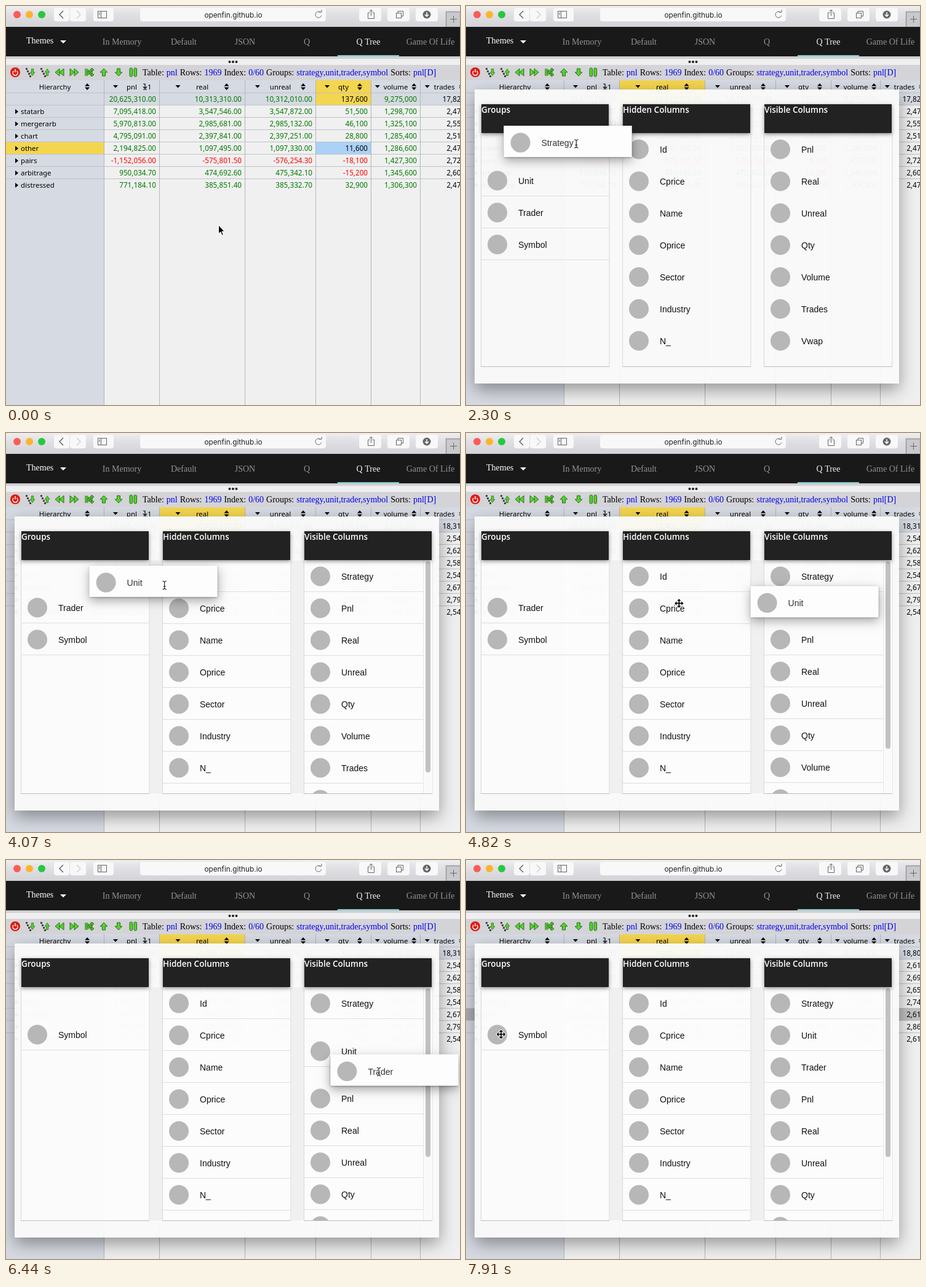
These frames come from a looping animation (738 px wide and 650 px high, 8 s). An HTML page with a canvas:

```html
<!DOCTYPE html>
<html lang="en">
<head>
<meta charset="utf-8">
<title>Grid column editor</title>
<style>
html, body { margin: 0; width: 738px; height: 650px; overflow: hidden; background: #f0f0f0; }
canvas { display: block; }
</style>
</head>
<body>
<canvas id="stage" width="738" height="650"></canvas>
<script>
const g = document.getElementById('stage').getContext('2d');
const LOOP = 8000, STEP = 148, ROW = 52, LIST_TOP = 208, SETTLE = 260;
const GRID = '11.7px "Noto Sans", sans-serif';
const LABEL = '11.4px "Noto Sans", sans-serif';
const SERIF = '14px "Liberation Serif", serif';
const SANS = '14px "Liberation Sans", sans-serif';
const HEAD = '600 13.5px "Open Sans", sans-serif';

// start and number of steps of each run of changes
const runs = [[0, 1], [500, 1], [1250, 2], [1700, 3], [2300, 8], [3490, 8], [4670, 5], [5550, 8], [6730, 2], [7170, 6]];

// real and unreal profit, quantity, volume, trades, and profit gained per update in thousands
const strategies = {
  statarb: [3547546, 3547872, 51500, 1298700, 2474, -50],
  mergerarb: [2985681, 2985132, 46100, 1325100, 2554, 130],
  chart: [2397840.6, 2397250.6, 28800, 1285400, 2514, -280],
  other: [1097495, 1097330, 11600, 1286600, 2474, 0],
  pairs: [-575801.5, -576254.3, -18100, 1427300, 2724, -60],
  arbitrage: [474692.6, 475342.1, -15200, 1345600, 2604, 470],
  distressed: [385851.4, 385332.7, 32900, 1306300, 2477, -120]
};

const edges = [159, 249, 388, 503, 593, 673, 751];
const labels = ['Hierarchy', 'pnl', 'real', 'unreal', 'qty', 'volume', 'trades'];

// pointer moves: start, end, target
const moves = [[1550, 2000, 106, 240], [2090, 2190, 106, 222], [2195, 3190, 550, 237], [3380, 3770, 105, 235],
  [3740, 4590, 540, 272], [4650, 5260, 78, 285], [5560, 6433, 606, 345], [7050, 7910, 57, 284]];

// close: the gap left behind shuts, open: a gap appears in the visible list
const drags = [
  { name: 'Strategy', grab: 2290, release: 3080, close: 2600, open: 2740 },
  { name: 'Unit', grab: 3780, release: 4720, close: LOOP, open: 4080 },
  { name: 'Trader', grab: 5690, release: 6500, close: 5840, open: 5850 }
];

const smooth = (t, from, length = 300) => {
  const k = Math.min(1, Math.max(0, (t - from) / length));
  return k * k * (3 - 2 * k);
};
const mix = (a, b, k) => a + (b - a) * k;

function heldTime(t) {
  const [start, steps] = runs.filter(r => r[0] <= t).pop();
  return start + STEP * Math.min(steps - 1, Math.floor((t - start) / STEP + 1e-6));
}

function pointerAt(t) {
  let x = 345, y = 357;
  for (const [start, end, toX, toY] of moves) {
    const k = Math.sin(Math.PI / 2 * Math.min(1, Math.max(0, (t - start) / (end - start))));
    x = mix(x, toX, k); y = mix(y, toY, k);
  }
  return [x, y];
}

function tableAt(t) {
  const update = (t > 2590) + (t > 7460);
  const rows = Object.entries(strategies).map(([name, [real, unreal, qty, volume, trades, gain]]) => {
    const a = real + 1000 * gain * update, b = unreal + 1000 * gain * update;
    return [name, a + b, a, b, qty, volume * (1 + .026 * update), trades + 70 * update];
  }).sort((p, q) => Math.abs(q[1]) - Math.abs(p[1]));
  const total = labels.map((_, c) => c ? rows.reduce((sum, r) => sum + r[c], 0) : '');
  return [total, ...rows];
}

function format(value, column) {
  const digits = column < 4 ? 2 : 0;
  return Number(value.toPrecision(column === 5 ? 5 : 7))
    .toLocaleString('en-US', { minimumFractionDigits: digits, maximumFractionDigits: digits });
}

function rect(x, y, w, h, color) { g.fillStyle = color; g.fillRect(x, y, w, h); }
function text(s, x, y, font, color, align = 'left') {
  g.font = font; g.fillStyle = color; g.textAlign = align; g.fillText(s, x, y);
}
function shape(points, color, stroke) {
  g.beginPath();
  points.forEach(([x, y]) => g.lineTo(x, y));
  g.closePath();
  g.fillStyle = color; g.fill();
  if (stroke) { g.strokeStyle = stroke; g.lineWidth = 1; g.stroke(); }
}
function disc(x, y, r, color) {
  g.beginPath(); g.arc(x, y, r, 0, 7); g.fillStyle = color; g.fill();
}
function lines(color, width, ...paths) {
  g.strokeStyle = color; g.lineWidth = width;
  g.beginPath();
  for (const p of paths) p.forEach(([x, y], i) => i ? g.lineTo(x, y) : g.moveTo(x, y));
  g.stroke();
}
function round(x, y, w, h, r, color) {
  g.beginPath(); g.roundRect(x, y, w, h, r); g.fillStyle = color; g.fill();
}
function placed(x, y, draw) { g.save(); g.translate(x, y); draw(); g.restore(); }
function shadow(blur, dy, alpha) {
  g.shadowColor = `rgba(0,0,0,${alpha})`; g.shadowBlur = blur; g.shadowOffsetY = dy;
}
// words laid out one after another
function words(list, x, gap, draw) {
  g.font = SERIF;
  list.forEach((s, i) => { draw(s, x, i); x += g.measureText(s).width + gap; });
}

function drawBrowser() {
  const bar = g.createLinearGradient(0, 0, 0, 34);
  bar.addColorStop(0, '#eeeeef'); bar.addColorStop(.4, '#e0e0e4'); bar.addColorStop(1, '#d2d2d7');
  rect(0, 0, 738, 34, bar);
  ['#fc5b57', '#fdb42c', '#27c83f'].forEach((c, i) => disc(18 + 20 * i, 14, 6, c));
  [[78, 25], [104, 26], [142, 33], [218, 302], [574, 36], [620, 36], [666, 36]]
    .forEach(([x, w]) => round(x, 3, w, 22, 4, '#f8f8f9'));
  lines('#555', 1.3, [[93, 8], [87, 14], [93, 20]]);
  lines('#ccc', 1.3, [[115, 8], [121, 14], [115, 20]]);
  g.strokeStyle = '#666'; g.lineWidth = 1;
  g.strokeRect(149.5, 8.5, 14, 11);
  lines('#666', 1, [[154.5, 9], [154.5, 19]], [[151, 11.5], [153, 11.5]], [[151, 13.5], [153, 13.5]]);
  text('openfin.github.io', 369.5, 19, '11.8px Inter, sans-serif', '#222', 'center');
  g.beginPath(); g.arc(508, 14, 5, .3, 5.5); g.stroke();
  lines('#666', 1, [[508, 10], [513, 10], [513, 6]]);
  placed(593.5, 6, () => lines('#666', 1, [[-2, 5], [-5, 5], [-5, 14.5], [5, 14.5], [5, 5], [2, 5]],
    [[0, 10], [0, 0]], [[-3, 3], [0, 0], [3, 3]]));
  g.strokeRect(634.5, 11.5, 8, 8);
  lines('#666', 1, [[637, 11], [637, 8.5], [645.5, 8.5], [645.5, 16.5], [643, 16.5]]);
  disc(684, 14, 6.5, '#666');
  lines('#fff', 1.5, [[684, 10], [684, 17]], [[681, 14], [684, 17], [687, 14]]);
  rect(715, 9, 23, 25, '#c9c9cd');
  g.strokeStyle = '#999'; g.strokeRect(715.5, 9.5, 23, 25);
  lines('#666', 1, [[722, 21.5], [733, 21.5]], [[727.5, 16], [727.5, 27]]);

  rect(0, 34, 738, 48, '#191919');
  text('Themes', 33, 61, SERIF, '#fff');
  shape([[88, 56], [98, 56], [93, 61]], '#fff');
  words(['In Memory', 'Default', 'JSON', 'Q', 'Q Tree', 'Game Of Life'], 157, 0, (s, _, i) =>
    text(s, [188.5, 289, 388.5, 489, 589, 690][i], 63, SERIF, s === 'Q Tree' ? '#f2f2f2' : '#929292', 'center'));
  rect(539, 80, 100, 2, '#80cbc4');
}

function drawToolbar() {
  rect(0, 82, 738, 4, '#d0d0d4');
  rect(0, 86, 738, 10, '#efeff0');
  [363.5, 369, 374.5].forEach(x => disc(x, 91, 2, '#222'));
  rect(0, 96, 738, 25, '#d3d3d8');
  disc(15, 108, 8, '#e01b10');
  g.strokeStyle = '#fff'; g.lineWidth = 1.5;
  g.beginPath(); g.arc(15, 109, 4, -.9, 4); g.stroke();
  lines('#fff', 1.5, [[15, 103], [15, 108]]);
  const lime = '#5ad02e', dark = '#25701a';
  const arrow = up => shape([[-6, 0], [0, 6], [6, 0], [2.5, 0], [2.5, -6], [-2.5, -6], [-2.5, 0]]
    .map(([x, y]) => [x, up ? -y : y]), lime, dark);
  const tree = up => {
    for (let i = 0; i < 4; i++) rect(-7 + 2 * i, -7 + 4 * i, 3, 3, '#444');
    g.translate(4, 0); g.scale(.65, .9); arrow(up);
  };
  const rewind = side => {
    g.scale(side, 1);
    [-7, 0].forEach(x => shape([[x, 0], [x + 7, -6], [x + 7, 6]], lime, dark));
  };
  const shuffle = () => [-4, 0, 4].forEach(y => {
    const path = [[-7, y], [-3, y], [3, -y], [6, -y]];
    lines(dark, 3.2, path);
    lines(lime, 1.6, path);
    if (y) shape([[4, y - 3], [8, y], [4, y + 3]], lime, dark);
  });
  const pause = () => [-6, 1].forEach(x => {
    round(x, -7, 4.5, 14, 2, lime);
    g.strokeStyle = dark; g.lineWidth = 1; g.stroke();
  });
  [() => tree(false), () => tree(true), () => rewind(1), () => rewind(-1), shuffle,
    () => arrow(true), () => arrow(false), pause].forEach((icon, i) => placed(39 + 24 * i, 108, icon));
  words(['Table:', 'pnl', 'Rows:', '1969', 'Index:', '0/60', 'Groups:', 'strategy,unit,trader,symbol', 'Sorts:', 'pnl[D]'],
    222, 4, (s, x, i) => text(s, x, 113, SERIF, i % 2 ? '#0000f0' : '#000'));
}

function drawHeader() {
  labels.forEach((name, c) => {
    const left = c ? edges[c - 1] + 1 : 0, right = edges[c], middle = (left + right) / 2;
    text(name, middle, 136, LABEL, '#000', 'center');
    const half = g.measureText(name).width / 2;
    const menu = (left + middle - half) / 2, sort = (right + middle + half) / 2;
    if (c) shape([[menu - 4, 129], [menu + 4, 129], [menu, 133.5]], '#000');
    if (name === 'pnl') {
      placed(sort - 5, 131, () => lines('#000', 1.2, [[-3, -4], [0, -4], [0, 3]], [[-3, .5], [0, 3.5], [3, .5]], [[-3, 5], [3, 5]]));
      text('1', sort - 1, 136, LABEL, '#000');
    } else {
      [-1, 1].forEach(d => shape([[sort - 4, 131.5 + d], [sort, 131.5 + 5.5 * d], [sort + 4, 131.5 + d]], '#000'));
    }
  });
}

function drawGrid(t) {
  const early = t < 500, gold = '#f4d54f', hot = early ? 4 : 2;
  rect(0, 121, 738, 529, '#f0f0f0');
  rect(0, 121, 738, 40, '#d6dae2');
  rect(0, 121, 159, 529, '#d6dae2');
  rect(edges[hot - 1] + 1, 121, edges[hot] - edges[hot - 1] - 1, 40, gold);
  if (early) { rect(0, 222, 159, 19, gold); rect(504, 222, 89, 19, '#abd1f7'); }
  for (let y = 141; y <= 281; y += 20) rect(0, y, 738, 1, '#bfc2c8');
  edges.forEach(x => rect(x, 121, 1, 529, '#b2b5bb'));
  if (t > 7600) rect(0, 242, 738, 19, 'rgba(0,0,0,.2)');
  drawHeader();
  tableAt(t).forEach((row, r) => {
    const y = 156 + 20 * r;
    if (r) {
      shape([[15, y - 8], [20, y - 4], [15, y]], '#000');
      text(row[0], 24, y, LABEL, '#000');
    }
    for (let c = 1; c < row.length; c++) {
      const picked = early && c === hot && (r === 0 || r === 4);
      const color = c === 6 || picked ? '#000' : row[c] < 0 ? '#f00' : '#007800';
      text(format(row[c], c), edges[c] - 5, y, GRID, color, 'right');
    }
  });
}

function item(name, x, top, ink = '#111') {
  disc(x + 27, top + 25.5, 16, '#b7b7b7');
  text(name, x + 61, top + 31, SANS, ink);
}

function drawList(title, x, items, t, count) {
  const scroll = count > 7, settled = t > 2400;
  if (settled) rect(x + 1, 160, 208, 427, 'rgba(255,255,255,.55)');
  lines('#d8d8d8', 1, [[x + .5, 208], [x + .5, 587]], [[x + 209, 208], [x + 209, 587]]);
  rect(x, 587, 209, 1, '#bdbdbd');
  g.save();
  g.beginPath(); g.rect(x, LIST_TOP, 209, 379); g.clip();
  items.forEach(([name, top]) => {
    if (settled || title === 'Groups') rect(x + 1, top + 50, scroll ? 193 : 208, 1, '#dedede');
    item(name, x, top);
  });
  if (scroll) {
    rect(x + 194, 208, 15, 379, '#fafafa');
    rect(x + 194, 208, 1, 379, '#e7e7e7');
    round(x + 198, 209, 8, 380 * 380 / (ROW * count) - 3, 4, '#c1c1c1');
  }
  g.restore();
  g.save();
  if (t > 1300) shadow(6, 2, .45);
  rect(x + 1, 160, 207, 47, '#222');
  g.restore();
  g.save();
  g.globalAlpha = 1;
  text(title, x + 1, 174, HEAD, '#fff');
  g.restore();
}

function groupRows(t) {
  return ['Strategy', 'Unit', 'Trader', 'Symbol'].map((name, i) => {
    const closed = drags.slice(0, i).reduce((sum, d) => sum + (t >= d.grab) + 51 * smooth(t, d.close), 0);
    return [name, LIST_TOP + ROW * i - closed];
  }).filter((_, i) => i > 2 || t < drags[i].grab);
}

function visibleRows(t) {
  const rows = ['Pnl', 'Real', 'Unreal', 'Qty', 'Volume', 'Trades', 'Vwap'].map((name, i) => {
    // the row next to the gap moves last
    const shift = drags.reduce((sum, d) =>
      sum + 51 * smooth(t, d.open + (i ? 0 : 230)) + (t >= d.release + SETTLE), 0);
    return [name, LIST_TOP + ROW * i + shift];
  });
  drags.forEach((d, i) => {
    // Unit makes room for a moment while Trader passes over it
    const bump = i === 1 ? 51 * (smooth(t, 5990) - smooth(t, 6290)) : 0;
    if (t >= d.release + SETTLE) rows.push([d.name, LIST_TOP + ROW * i + bump]);
  });
  return rows;
}

function drawCard(drag, slot, t) {
  const [px, py] = pointerAt(Math.min(t, drag.release) - 60);
  const k = smooth(t, drag.release, SETTLE);
  const x = mix(px - 76, 485, k), y = mix(py - 28, LIST_TOP + ROW * slot, k);
  g.save();
  shadow(16, 6, .35);
  rect(x, y, 208, 51, '#fdfdfd');
  shadow(3, 1, .4);
  rect(x, y, 208, 51, '#fdfdfd');
  g.restore();
  item(drag.name, x, y + 2, '#333');
}

function drawPanel(t) {
  g.save();
  g.globalAlpha = t < 1390 ? .5 : 1;
  g.save();
  g.beginPath(); g.rect(0, 122, 738, 528); g.rect(14, 136, 690, 479); g.clip('evenodd');
  shadow(26, 10, .38);
  rect(14, 136, 690, 479, '#000');
  g.restore();
  rect(14, 136, 690, 479, 'rgba(250,250,250,.95)');
  if (t > 2400) [234, 464].forEach(x => rect(x, 208, 20, 379, '#f0f0f0'));
  const hidden = ['Id', 'Cprice', 'Name', 'Oprice', 'Sector', 'Industry', 'N_'].map((s, i) => [s, LIST_TOP + ROW * i]);
  const count = drags.reduce((n, d) => n + (t > d.open + 150), 7);
  drawList('Groups', 24, groupRows(t), t, 0);
  drawList('Hidden Columns', 254, hidden, t, 0);
  drawList('Visible Columns', 484, visibleRows(t), t, count);
  drags.forEach((d, i) => {
    if (t >= d.grab && t < d.release + SETTLE) drawCard(d, i, t);
  });
  g.restore();
}

function drawPointer(t) {
  const [x, y] = pointerAt(t);
  placed(x, y, () => {
    if (t < 1700) {
      shape([[.5, 0], [.5, 14], [3.8, 11], [6, 16.5], [8.3, 15.5], [6, 10.3], [10, 10]], '#000', '#fff');
    } else if (drags.some(d => t >= d.grab && t < d.release)) {
      const beam = [[[-3, -7], [0, -5.5], [3, -7]], [[0, -5.5], [0, 5.5]], [[-3, 7], [0, 5.5], [3, 7]], [[-2, 2], [2, 2]]];
      lines('#fff', 2.5, ...beam);
      lines('#111', 1.1, ...beam);
    } else {
      [['#fff', 4, 8.5], ['#000', 1.7, 7.2]].forEach(([color, w, r]) => {
        lines(color, w, [[-5, 0], [5, 0]], [[0, -5], [0, 5]]);
        for (let i = 0; i < 4; i++) {
          g.rotate(Math.PI / 2);
          shape([[r, 0], [4, 4 - r], [4, r - 4]], color);
        }
      });
    }
  });
}

function frame(now) {
  const t = heldTime(now % LOOP);
  drawBrowser();
  drawToolbar();
  drawGrid(t);
  if (t >= 1250) drawPanel(t);
  drawPointer(t);
}

let began;
function tick(now) {
  began ??= now;
  frame(now - began);
  requestAnimationFrame(tick);
}
frame(0);
requestAnimationFrame(tick);
</script>
</body>
</html>
```
